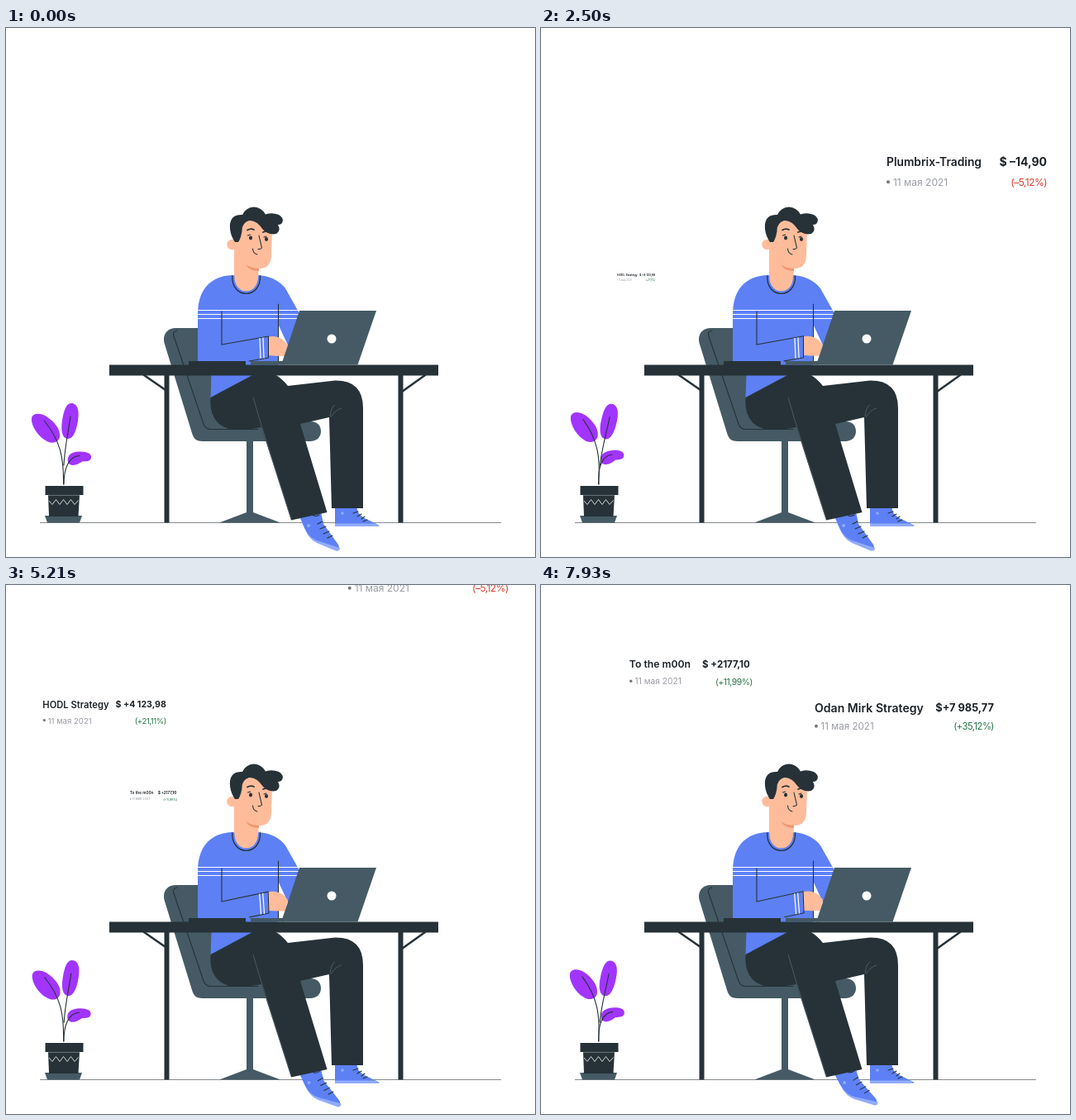
These frames come from a looping animation (640x640 px, 8 s). An HTML page:

```html
<!DOCTYPE html>
<html lang="ru">
<head>
<meta charset="utf-8">
<style>
  html, body { margin: 0; width: 100%; height: 100%; overflow: hidden; background: #fff; }
  svg { display: block; width: 100%; height: 100%; }
  text { font-family: Inter, sans-serif; }
  .name { font-weight: 600; fill: #1b2126; }
  .sum { font-weight: 700; fill: #1b2126; text-anchor: end; }
  .date { fill: #999ca4; }
  .change { text-anchor: end; letter-spacing: -.045em; }
  .ink { fill: #263238; }
  .slate { fill: #455a64; }
  .blue { fill: #5d80f5; }
  .sole { fill: #91acfb; }
  .skin { fill: #ffbc9b; }
  .leaf { fill: #a135ff; }
  .line { fill: none; stroke: #263238; stroke-width: 1.1; stroke-linecap: round; stroke-linejoin: round; }
  .white { fill: none; stroke: #fff; stroke-width: 1.2; }
</style>
</head>
<body>
<svg viewBox="0 0 640 640">
  <path d="M41 598.5H599" stroke="#858a8d" fill="none"/>

  <!-- plant -->
  <g id="smallLeaf">
    <path class="leaf" d="M75 526C73 517 79 513 88 512.5C98 512 104 515 103 520C102 525 97 524 92 524.5C86 529 79 531 75 526Z"/>
    <path class="line" d="M70 552C70 533 76 518 89 517.5"/>
  </g>
  <g id="tallLeaves">
    <path class="leaf" d="M31 472C32 466 41 465 49 470C58 476 66 485 65 494C64 502 55 504 48 499C39 494 30 481 31 472Z"/>
    <path class="leaf" d="M79 454C87 454 89 464 87 475C85 488 81 497 75 497C68 497 66 487 68 475C70 462 73 454 79 454Z"/>
    <path class="line" d="M69.5 552C70 523 67 500 46 475M70 529C71 507 75 492 78 470"/>
  </g>
  <path class="slate" d="M47 590H92L89 598.5H50Z"/>
  <path class="ink" d="M47.5 554H93.5V565H89L87.500 591H52L51 565H47.5Z"/>
  <path d="M51 565.4H89" stroke="#69777d" fill="none"/>
  <path d="M52 572l4 4.500 4.500-6 4.500 6 4.500-6 4.500 6 4.500-6 4.500 6 4.500-5" stroke="#cfd5d8" fill="none"/>

  <!-- chair -->
  <path class="slate" d="M191.500 381C189 370 196 363 205 363H262L290 476H368C377 476 381 481 381 488C381 495 376 500 368 500H238C229 500 227 496 225 490Z"/>
  <path class="line" d="M207 366Q201 367 203 373L239 479Q241 485.500 248 485.500H305"/>
  <path class="slate" d="M291 499H299V586L332 598.500H258L291 586Z"/>

  <!-- feet -->
  <g>
    <path class="blue" d="M398 579H424L426 586Q430 592 440 596L452 602H398Z"/>
    <path class="sole" d="M398 599.500H446L452 603H398Z"/>
    <circle class="sole" cx="407" cy="587" r="1.800"/>
    <path class="line" d="M420 587l6-2M425 591l5-3M430 594l4-3M432 597l5-2"/>
  </g>
  <g id="foot">
    <path class="blue" d="M353 586L380 580L384 600L402 625Q405 632 400 632L376 622Q366 617 361 605Z"/>
    <path class="sole" d="M362 607Q368 617 376 620L404 629Q404 633.500 399 632.500L376 623Q367 619 362 607Z"/>
    <circle class="sole" cx="366" cy="602" r="1.900"/>
    <path class="line" d="M371 589q3 3 8 0M377 600l6-3M380 606l7-3M384 612l7-3M389 617l6-3"/>
  </g>

  <!-- torso -->
  <path class="blue" d="M274 299C246 300 232 318 232 346V404H249L247.500 448L300 428L330 407V360L342 386L356 347L338 315Q327 301 306 299Z"/>
  <path class="white" d="M232 341.500H354M232 346.500H354M232 351.500H353"/>
  <path class="line" d="M329.500 334V404"/>
  <path class="skin" d="M276 255H305.500V300C305.500 325 276 325 276 300Z"/>
  <path d="M275.300 300C274.500 326 306.500 326 306 300" fill="none" stroke="#5d80f5" stroke-width="2"/>
  <path class="line" d="M273.800 300C272.500 328.500 308.500 328.500 307.500 300" style="stroke-width:1.300"/>

  <!-- head -->
  <path class="skin" d="M276 238Q298 222 322 242L321 276Q320 291 307 291Q296 292 288 284L276 275Z"/>
  <circle class="skin" cx="273.500" cy="262" r="6.200"/>
  <path d="M290 286Q297 291 306 291V294Q295 294 290 286Z" fill="#f0946f"/>
  <path class="ink" d="M277 259Q270 249 271 237Q273 225 286 226Q290 217 300 216.500Q309 217 314 225.500Q322 223 330 226Q338 231 333 237Q331 238 329 238Q333 245 327 249Q318 251 311 244Q303 232 294 233Q285 236 285.500 246Q284 255 281 259Z"/>
  <path class="line" d="M292 244.500Q296 242 300 244M311 247Q315 245 319 247.500" style="stroke-width:1.700"/>
  <path class="line" d="M306 251L309.500 266Q308 268 305 267.500M298.500 267Q299 273 304 274M292.500 251l3-1M312 253l3-1"/>
  <ellipse class="ink" cx="296" cy="254" rx="2" ry="2.400"/>
  <ellipse class="ink" cx="315" cy="255.500" rx="2" ry="2.400"/>

  <!-- forearm -->
  <path class="line" d="M261 343V383"/>
  <g id="forearm">
    <path class="skin" d="M316 374C325 371 335 374 341 384L337 397Q326 397 317 396Z"/>
    <path class="blue" d="M261 383L317 373V399L290 404H262Z"/>
    <path class="line" d="M261 383L317.500 373V399L294 403"/>
    <path class="white" d="M307 375L308 400M311 374.500L312 399.500"/>
  </g>

  <!-- trousers -->
  <path class="ink" d="M247.500 447L300 419H325Q334 424 341 433L398 426.500Q432 426 432 460V581H394L391 471L356 479L388.500 586L345 595.500L309 483Q296 486 275 486Q245 481 247.500 447Z"/>
  <path d="M299 447L309 481M309 481L345 594M392 470Q393 459 398 456M393 471Q398 462 406 460" fill="none" stroke="#5b6a71" stroke-width=".7"/>

  <!-- desk and laptop -->
  <path class="line" d="M167 420L193 438M507 420L479 440" style="stroke-width:2.600"/>
  <path class="ink" d="M125 407.500H523V420.500H125ZM191.500 420H197.500V598.500H191.500ZM474.500 420H480.500V598.500H474.500ZM221 403H290V408H221Z"/>
  <path class="slate" d="M296 403H336V407.500H296Z"/>
  <path class="slate" d="M355 342H448L425.500 407.500H333Z"/>
  <circle cx="394" cy="376" r="5.500" fill="#fff"/>

  <g id="cards"></g>
</svg>
<script>
const LOOP = 8000, GROW = 650;
const RED = '#d8412b', GREEN = '#257547';

// x, y: centre of the card; w: width; gap: distance between its two rows
const cards = [
  { start: 230, x: 489, y: 255.5, w: 194, gap: 24.5, sizes: [13.8, 14, 12, 12],
    name: 'Plumbrix-Trading', sum: '$ –14,90', change: '(–5,12%)', color: RED },
  { start: 2300, x: 110, y: 273.5, w: 149.5, gap: 19.5, sizes: [11.2, 10.6, 9.6, 9.6],
    name: 'HODL Strategy', sum: '$ +4 123,98', change: '(+21,11%)', color: GREEN },
  { start: 4960, x: 174, y: 229, w: 149, gap: 21, sizes: [12.2, 11.5, 10.2, 10.4], inset: 3,
    name: 'To the m00n', sum: '$ +2177,10', change: '(+11,99%)', color: GREEN },
  { start: 6500, x: 426.5, y: 190, w: 217, gap: 22.5, sizes: [14.1, 12.8, 11.6, 11.2],
    name: 'Odan Mirk Strategy', sum: '$+7 985,77', change: '(+35,12%)', color: GREEN },
];

// Floating path shared by all cards: age, dx, dy
const path = [
  [0, 6, 36], [200, 5, 28], [910, 0, 0], [1480, 14, -33], [2270, 26, -81],
  [3060, 5, -128], [3650, -6, -163], [4200, 1.5, -208], [5000, 22, -265], [5600, 20, -310],
];

const byId = id => document.getElementById(id);

function add(parent, tag, attrs, content = '') {
  const el = document.createElementNS(parent.namespaceURI, tag);
  for (const key in attrs) el.setAttribute(key, attrs[key]);
  el.textContent = content;
  return parent.appendChild(el);
}

function buildCard(card) {
  const { w, gap, sizes, inset = 0 } = card;
  const group = add(byId('cards'), 'g', {});
  const top = -gap / 2, low = gap / 2;
  const label = (cls, x, mid, size, content, style = '') =>
    add(group, 'text', { class: cls, x, y: mid + size * 0.36, 'font-size': size, style }, content);
  label('name', -w / 2, top, sizes[0], card.name);
  label('sum', w / 2 - inset, top, sizes[1], card.sum);
  add(group, 'circle', { cx: -w / 2 + 2, cy: low - 0.5, r: sizes[2] / 6, fill: '#73777c' });
  label('date', -w / 2 + sizes[2] * 0.66, low, sizes[2], '11 мая 2021');
  label('change', w / 2, low, sizes[3], card.change, `fill:${card.color}`);
  card.group = group;
}

// Cubic Hermite through the path points
function pathAt(age) {
  const last = path.length - 1;
  let i = 0;
  while (i < last - 1 && age > path[i + 1][0]) i++;
  const [a, b] = [path[i], path[i + 1]];
  const span = b[0] - a[0], u = Math.min(1, (age - a[0]) / span);
  const slope = (k, axis) => {
    const p = path[Math.max(0, k - 1)], n = path[Math.min(last, k + 1)];
    return (n[axis] - p[axis]) / (n[0] - p[0]) * span;
  };
  return [1, 2].map(axis => {
    const ease = u * u * (3 - 2 * u);
    return a[axis] + (b[axis] - a[axis]) * ease
      + slope(i, axis) * u * (1 - u) ** 2 - slope(i + 1, axis) * u * u * (1 - u);
  });
}

function drawCard(card, t) {
  const age = t - card.start;
  card.group.style.display = age > 0 && age < 5600 ? '' : 'none';
  if (age <= 0) return;
  const [dx, dy] = pathAt(age);
  const scale = Math.min(1, age / GROW);
  card.group.setAttribute('transform', `translate(${card.x + dx} ${card.y + dy}) scale(${scale})`);
}

const swing = (t, period) => (1 - Math.cos(2 * Math.PI * t / period)) / 2;
const turn = (id, angle, x, y) => byId(id).setAttribute('transform', `rotate(${angle} ${x} ${y})`);

function draw(now) {
  const t = now % LOOP;
  const sway = swing(t, 5950);
  turn('tallLeaves', 3.8 * sway, 70, 552);
  turn('smallLeaf', -5 * sway, 70, 552);
  turn('foot', -8.2 * swing(t, 2400), 368, 590);
  turn('forearm', -2.5 * swing(t, 1200), 261, 383);
  cards.forEach(card => drawCard(card, t));
}

cards.forEach(buildCard);
const begin = performance.now();
function tick() {
  draw(performance.now() - begin);
  requestAnimationFrame(tick);
}
tick();
</script>
</body>
</html>
```
